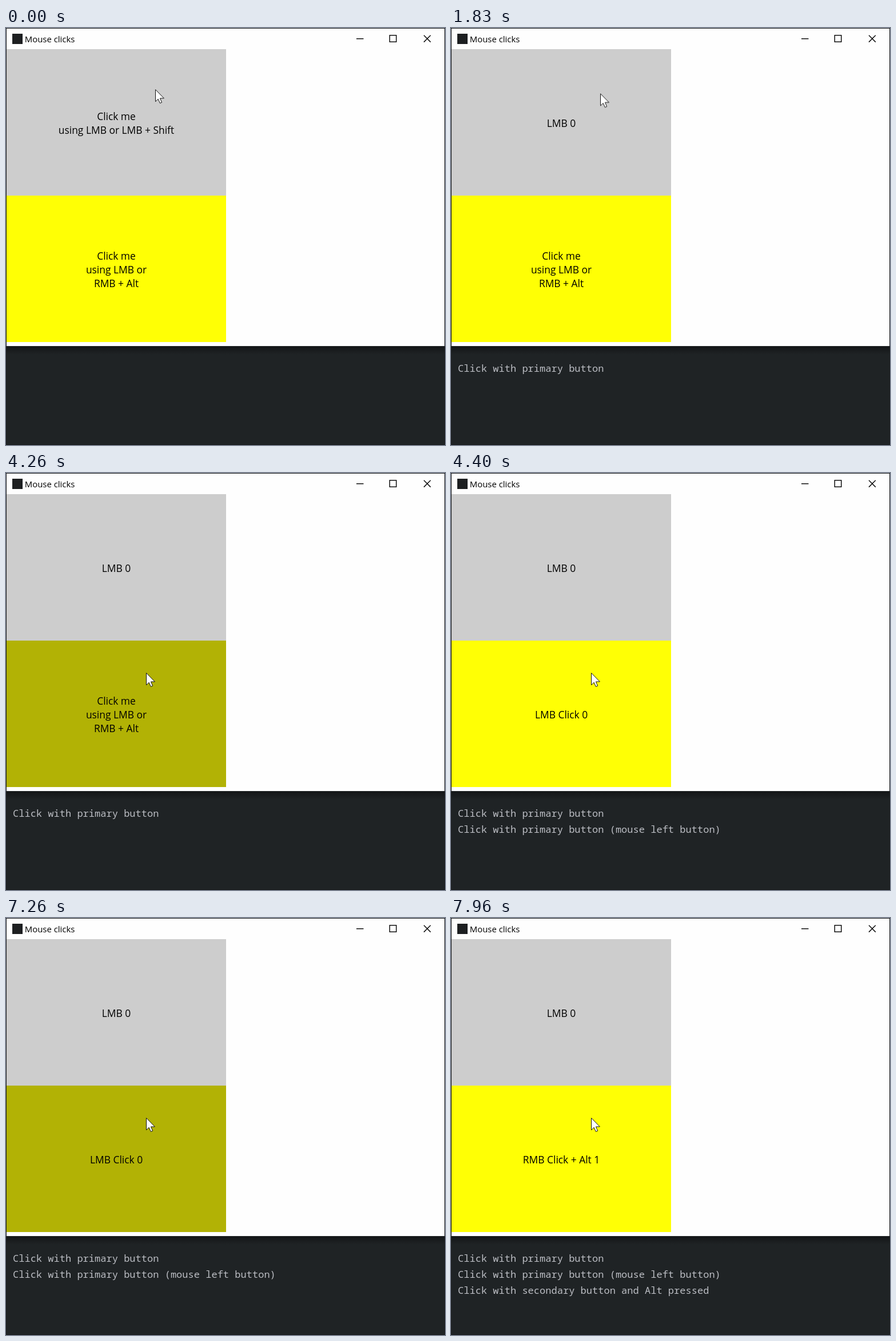
An HTML page for the animation above (8000 ms loop, 768x729 px).

```html
<!DOCTYPE html>
<html lang="en">
<head>
<meta charset="utf-8">
<title>Mouse clicks</title>
<style>
  html, body { margin: 0; width: 100%; height: 100%; overflow: hidden; background: #1f2325; }
  svg { display: block; width: 768px; height: 729px; }
  rect { shape-rendering: crispEdges; }
  text { font-family: "Open Sans", "Noto Sans", sans-serif; white-space: pre; }
  .title { font-size: 14.9px; }
  .label text { font-size: 17.4px; text-anchor: middle; }
  .console text { font: 17.05px "Noto Sans Mono", "DejaVu Sans Mono", monospace; fill: #bcbec4; }
  .icon { fill: none; stroke: #111; stroke-width: 1.5; }

  /* Hard switches */
  .switch { animation: 8s step-end infinite; }
  .before-left { animation-name: before-left; }
  .after-left { animation-name: after-left; }
  .before-click { animation-name: before-click; }
  .after-click { animation-name: after-click; }
  .until-right { animation-name: until-right; }
  .after-right { animation-name: after-right; }
  .press { animation-name: press; }
  @keyframes before-left { 0% { opacity: 1 } 5.375%, 100% { opacity: 0 } }
  @keyframes after-left { 0% { opacity: 0 } 5.375%, 100% { opacity: 1 } }
  @keyframes before-click { 0% { opacity: 1 } 54.5%, 100% { opacity: 0 } }
  @keyframes after-click { 0% { opacity: 0 } 54.5%, 100% { opacity: 1 } }
  @keyframes until-right { 0% { opacity: 0 } 54.5% { opacity: 1 } 96.625%, 100% { opacity: 0 } }
  @keyframes after-right { 0% { opacity: 0 } 96.625%, 100% { opacity: 1 } }
  @keyframes press {
    0%, 54.5%, 92.5%, 100% { fill: #ffff05 }
    53.25%, 90.75% { fill: #b2b205 }
  }

  /* Pointer travel, one axis per group */
  .move-x { animation: move-x 8s linear infinite; }
  .move-y { animation: move-y 8s linear infinite; }
  @keyframes move-x {
    0%, 22.875% { transform: translateX(261px); animation-timing-function: ease-in-out }
    26% { transform: translateX(266px); animation-timing-function: ease-in-out }
    32.875%, 100% { transform: translateX(245px) }
  }
  @keyframes move-y {
    0%, 22.5% { transform: translateY(107px) }
    22.875% { transform: translateY(114px); animation-timing-function: cubic-bezier(.3, .25, .6, 1) }
    32.875% { transform: translateY(347px); animation-timing-function: step-end }
    33.75% { transform: translateY(348px); animation-timing-function: step-end }
    34.125%, 100% { transform: translateY(349px) }
  }
</style>
</head>
<body>
<svg viewBox="0 0 768 729">
  <defs>
    <linearGradient id="shadow" x2="0" y2="1">
      <stop offset="0" stop-color="#141618"/>
      <stop offset="1" stop-color="#1f2325"/>
    </linearGradient>
  </defs>

  <rect width="768" height="729" fill="#16191b"/>
  <rect x="1" y="1" width="766" height="727" fill="#1f2325"/>
  <rect x="1" y="557" width="766" height="14" fill="url(#shadow)"/>

  <!-- Window -->
  <rect x="1" y="1" width="766" height="555" fill="#fefefe"/>
  <rect x="11" y="10" width="18" height="18" fill="#1d1f21"/>
  <text class="title" x="32.8" y="25">Mouse clicks</text>
  <path class="icon" d="M613 18.75h12.5M671.25 12.75h11.5v11.5h-11.5zM731 12.8l11.8 11.8m0-11.8l-11.8 11.8"/>

  <rect x="1" y="37" width="384" height="256" fill="#cdcdcd"/>
  <rect class="switch press" x="1" y="293" width="384" height="256" fill="#ffff05"/>

  <g class="label">
    <g class="switch before-left">
      <text x="193" y="161">Click me</text>
      <text x="193" y="184.5">using LMB or LMB + Shift</text>
    </g>
    <text class="switch after-left" x="193" y="173">LMB 0</text>
    <g class="switch before-click">
      <text x="193" y="405">Click me</text>
      <text x="193" y="429">using LMB or</text>
      <text x="193" y="452.5">RMB + Alt</text>
    </g>
    <text class="switch until-right" x="193" y="429">LMB Click 0</text>
    <text class="switch after-right" x="193" y="429">RMB Click + Alt 1</text>
  </g>

  <g class="console">
    <text class="switch after-left" x="12" y="601">Click with primary button</text>
    <text class="switch after-click" x="12" y="629">Click with primary button (mouse left button)</text>
    <text class="switch after-right" x="12" y="657">Click with secondary button and Alt pressed</text>
  </g>

  <g class="move-x">
    <g class="move-y">
      <path d="M.5 .7V21.6L5.2 17.2L8.4 24.5L11.6 23.1L8.5 15.9H15.4Z" fill="#fff" stroke="#111"/>
    </g>
  </g>
</svg>
</body>
</html>
```
